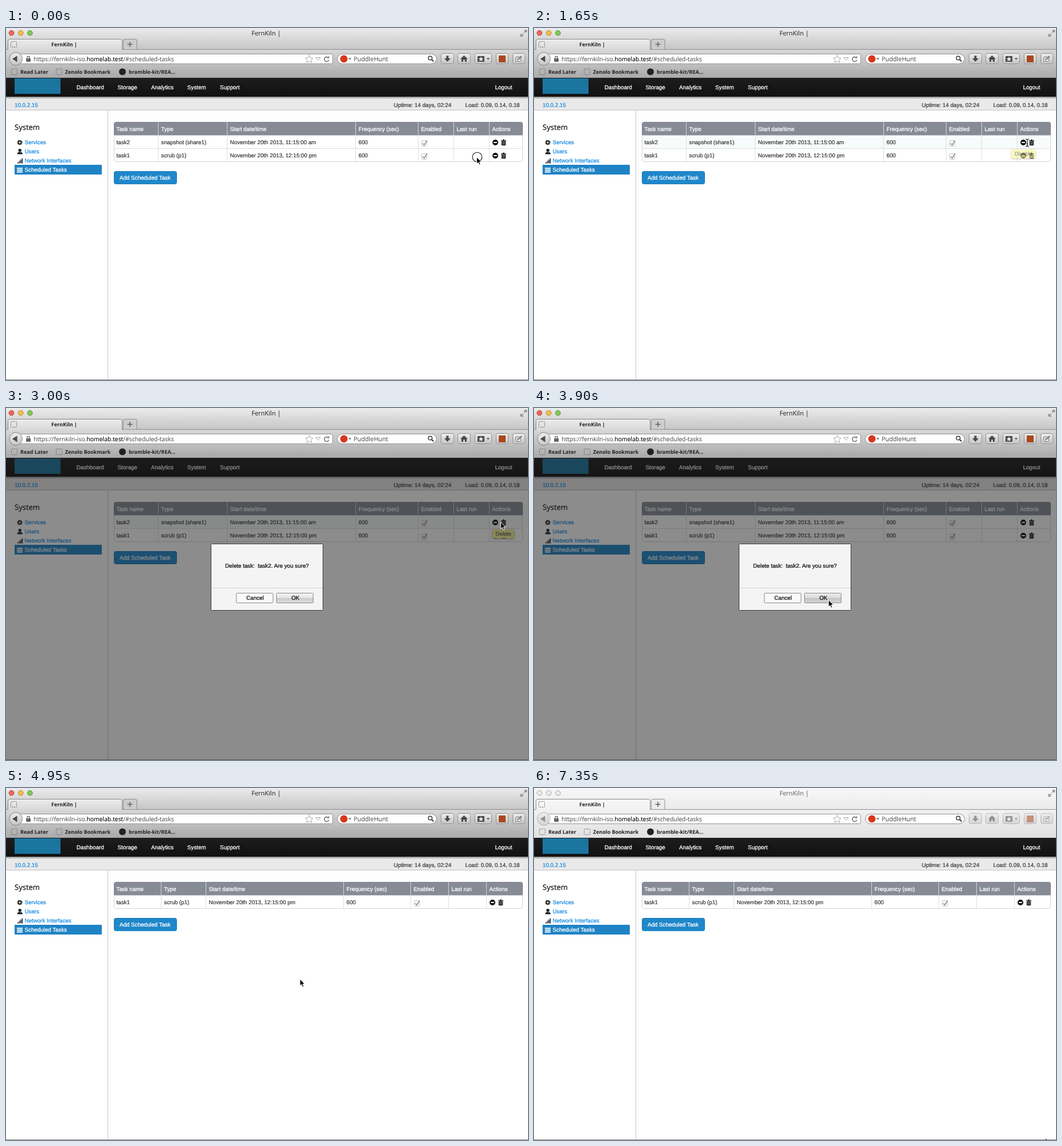
Animation, 910 px wide and 615 px high, one loop 7390 ms. Source, as an HTML page:

```html
<!DOCTYPE html>
<html lang="en">
<head>
<meta charset="utf-8">
<title>Scheduled tasks</title>
<style>
  html, body { margin: 0; width: 100%; height: 100%; overflow: hidden; background: #fff; }
  svg { display: block; }
  text {
    font: 9.77px "Liberation Sans", Arial, sans-serif; color: #333; fill: currentColor;
    stroke: currentColor; stroke-width: .2; text-rendering: geometricPrecision; white-space: pre;
  }
  .ui { font: 10.4px "Open Sans", sans-serif; color: #555; stroke-width: .1; }
  .bold { font: bold 9px "Open Sans", sans-serif; color: #222; stroke-width: 0; }
  .head { font: 13px "Open Sans", sans-serif; color: #111; }
  .white { color: #fff; stroke-width: .3; }
  .link { color: #0a86e0; }
  .black { color: #000; }
  .tip { font-size: 9.4px; color: #555; }
</style>
</head>
<body>
<svg id="stage" width="910" height="615" viewBox="0 0 910 615">
  <defs>
    <linearGradient id="titleBg" x2="0" y2="1"><stop stop-color="#ebebeb"/><stop offset="1" stop-color="#c6c6c6"/></linearGradient>
    <linearGradient id="tabBg" x2="0" y2="1"><stop stop-color="#ececec"/><stop offset="1" stop-color="#d9d9d9"/></linearGradient>
    <linearGradient id="toolBg" x2="0" y2="1"><stop stop-color="#d8d8d8"/><stop offset="1" stop-color="#a9a9a9"/></linearGradient>
    <linearGradient id="keyBg" x2="0" y2="1"><stop stop-color="#eee"/><stop offset="1" stop-color="#c4c4c4"/></linearGradient>
    <linearGradient id="navBg" x2="0" y2="1"><stop stop-color="#1d1d1d"/><stop offset="1" stop-color="#111"/></linearGradient>
    <linearGradient id="shade" x2="0" y2="1"><stop stop-color="#8c8c8c"/><stop offset="1" stop-color="#e8e8e8"/></linearGradient>
    <linearGradient id="okBg" x2="0" y2="1"><stop stop-color="#f6f6f6"/><stop offset=".5" stop-color="#e2e2e2"/><stop offset=".52" stop-color="#cbcbcb"/><stop offset="1" stop-color="#dedede"/></linearGradient>
    <filter id="soft" x="-30%" y="-50%" width="160%" height="220%"><feDropShadow dx="0" dy="1" stdDeviation="1.8" flood-color="#000" flood-opacity=".45"/></filter>
  </defs>
</svg>
<script>
const LOOP = 7390;
const stage = document.getElementById('stage');

const rect = (x, y, w, h, fill, more = '') =>
  `<rect x="${x}" y="${y}" width="${w}" height="${h}" fill="${fill}" ${more}/>`;
const box = (x, y, w, h, fill, stroke, r = 0) =>
  rect(x + .5, y + .5, w - 1, h - 1, fill, `stroke="${stroke}" rx="${r}"`);
const text = (x, y, s, cls = '', more = '') => `<text x="${x}" y="${y}" class="${cls}" ${more}>${s}</text>`;
const path = (d, fill, more = '') => `<path d="${d}" fill="${fill}" ${more}/>`;
const line = (d, color, w = 1) => path(d, 'none', `stroke="${color}" stroke-width="${w}"`);
const circle = (x, y, r, fill, more = '') => `<circle cx="${x}" cy="${y}" r="${r}" fill="${fill}" ${more}/>`;
const group = (id, inner, more = '') => `<g id="${id}" ${more}>${inner}</g>`;
const blank = (x, y) => rect(x + .5, y + .5, 10, 10, 'none', 'stroke="#666" stroke-dasharray="2 1.4" rx="1"');

const tabShape = 'M3.5 38V23q0-3.5 3.5-3.5H199q3.5 0 3.5 3.5V38';
const plusShape = 'M204.500 37V22q0-2.500 2.500-2.500h18.500q2.500 0 2.500 2.500V37';

function chromeBack() {
  return rect(0, 0, 910, 37, 'url(#titleBg)') + rect(0, 37, 910, 50, 'url(#toolBg)') +
    path(plusShape, '#cdcdcd') + path(tabShape, 'url(#tabBg)') +
    rect(0, 0, 910, 87, '#fff', 'id="veil"') +
    line('M0 37.5H3.5M202.5 37.5H910', '#8f8f8f') + line(plusShape, '#8f8f8f') + line(tabShape, '#8a8a8a');
}

function lights() {
  const one = (x, fill, edge) => circle(x, 8.7, 4.3, fill, `stroke="${edge}"`);
  return group('lit', one(9.5, '#f0645a', '#b5362f') + one(25.7, '#f6bd4c', '#b98324') + one(41.8, '#83c95a', '#4c8d2f')) +
    group('unlit', [9.5, 25.7, 41.8].map(x => one(x, '#ececec', '#a0a0a0')).join(''));
}

function toolButtons() {
  const key = (x, w) => box(x, 44, w, 19, 'url(#keyBg)', '#929292', 3);
  const ink = '#4a4a4a';
  return key(758, 23) + path('M767.5 48.5h4v4.5h3.5l-5.5 6-5.5-6h3.5z', ink) +
    key(787, 23) + path('M798.5 48l6.5 6h-2v5h-3v-3.5h-3v3.5h-3v-5h-2z', ink) +
    key(817, 30) + rect(822, 49, 12, 10, ink, 'rx="1"') +
    path('M828 50l1.3 2.7 3 .3-2.2 2 .6 3-2.7-1.5-2.7 1.5.6-3-2.2-2 3-.3z', '#e4e4e4') +
    path('M838 52.5h5l-2.5 3z', ink) +
    key(854, 22) + rect(859, 48, 12, 12, '#a9481c') +
    key(883, 22) + box(888, 50, 10, 9, '#eee', '#777', 1) + line('M892 56l7-7', '#777', 2) + line('M890 53h4M890 56h3', '#888') +
    circle(17, 54, 11.3, 'url(#keyBg)', 'stroke="#808080"') + path('M11 54l8.5-5.5v11z', ink);
}

function chromeFront() {
  const star = path('M528.5 47.5l2 4.5 4.7.5-3.5 3.2 1 4.8-4.2-2.5-4.2 2.5 1-4.8-3.5-3.2 4.7-.5z', '#fff', 'stroke="#aaa"');
  return lights() +
    text(428, 13, 'FernKiln |', 'ui', 'id="title" style="font-size:11px;color:#333"') +
    line('M897 14.5h4.5M897.5 14.5v-4.5M898 14l4-4M907.5 4h-4.5M907.5 3.5v4.5M907 4l-4 4', '#777', 1.2) +
    blank(8, 23) + text(79, 32, 'FernKiln |', 'bold') +
    line('M211.5 28.5h9M216 24v9', '#5e5e5e', 1.5) +
    box(24, 45, 546, 18, '#fff', '#929292', 3) +
    group('tools', toolButtons()) +
    rect(35, 53, 8, 6, '#666', 'rx="1"') + line('M36.8 53.5v-2a2.2 2.2 0 0 1 4.4 0v2', '#666', 1.3) +
    text(48, 58, 'https://fernkiln-iso.<tspan fill="#000" stroke="#000">homelab.test</tspan>/#scheduled-tasks', 'ui') +
    star + path('M540 51.5h8l-4 5z', '#fff', 'stroke="#aaa"') +
    line('M561.5 51.5a4 4 0 1 0 1.3 4', '#777', 1.6) + path('M559.5 52.8h4v-4z', '#777') +
    box(577, 45, 174, 18, '#fff', '#929292', 9) +
    circle(589, 54, 6.5, '#d9361f') + path('M597 52.5h5l-2.5 3z', '#666') +
    text(606, 58, 'PuddleHunt', 'ui', 'style="font-size:10.8px"') +
    circle(739.5, 52.5, 3.3, 'none', 'stroke="#333" stroke-width="1.4"') + line('M742 55l3.5 3.5', '#333', 1.8) +
    blank(9, 71) + text(25, 80, 'Read Later', 'bold') +
    blank(87, 71) + text(103, 80, 'Zenolo Bookmark', 'bold') +
    circle(203, 76.5, 6, '#222') + text(214, 80, 'bramble-kit/REA...', 'bold');
}

function icons(x, y) {
  return circle(x + .5, y, 5, '#111') + rect(x - 2.3, y - 1, 5.6, 2, '#fff') +
    path(`M${x + 10.5} ${y - 3.8}h3v-1.4h3v1.4h3v1.5h-9z`, '#222') +
    rect(x + 11.3, y - 1.8, 7.4, 7, '#222', 'rx="1"') +
    line(`M${x + 13.3} ${y - .5}v4.3M${x + 15} ${y - .5}v4.3M${x + 16.7} ${y - .5}v4.3`, '#aaa', .6);
}

function table(cols, rows) {
  const heads = ['Task name', 'Type', 'Start date/time', 'Frequency (sec)', 'Enabled', 'Last run', 'Actions'];
  const rowTop = r => Math.floor(188 + r * 23.4);
  const bottom = rowTop(rows.length);
  let s = path('M188 187.5V168q0-4 4-4H897q4 0 4 4v19.5z', '#868b96');
  heads.forEach((h, i) => { s += text(cols[i] + 4.5, 180, h, 'white'); });
  rows.forEach((row, r) => {
    const y = rowTop(r);
    if (rows.length > 1 && !r) s += rect(189, y, 711, 22, '#f8fbfb', 'id="hover"');
    if (r) s += line(`M188 ${y - .5}H901`, '#ddd');
    row.forEach((v, i) => { s += text(cols[i] + 4.5, y + 15, v); });
    s += box(cols[4] + 5, y + 8, 10, 11, '#f8f8f8', '#c4c4c4', 2) +
      line(`M${cols[4] + 7.5} ${y + 13.5}l2.5 3 5-8`, '#8c8c8c', 1.5) +
      icons(cols[6] + 9.5, y + 12);
  });
  cols.slice(1).forEach(x => {
    s += line(`M${x - .5} 164V187.5`, '#d4d5d9') + line(`M${x - .5} 188V${bottom}`, '#ddd');
  });
  s += path(`M188.5 187V${bottom - 4}q0 3.5 3.5 3.5H897q3.5 0 3.5-3.5V187`, 'none', 'stroke="#d5d5d5"');
  const by = bottom + 16;
  return s + box(188, by, 110, 23, '#1f87ca', '#1b7ebd', 3) + text(198, by + 15, 'Add Scheduled Task', 'white');
}

function page() {
  let s = rect(0, 87, 910, 528, '#fff') + rect(0, 123, 910, 20, '#e9e9e9') +
    rect(0, 120, 910, 4, 'url(#shade)') + rect(0, 87, 910, 33, 'url(#navBg)') +
    rect(0, 143, 910, 1, '#c4c4c4') + rect(177, 144, 1, 470, '#c9c9c9') +
    rect(15, 88, 80, 27, '#1a759f');
  const menu = [[123, 'Dashboard'], [194.5, 'Storage'], [253, 'Analytics'], [316, 'System'], [373, 'Support'], [852.5, 'Logout']];
  menu.forEach(([x, v]) => { s += text(x, 107, v, 'white'); });
  s += text(15, 138, '10.0.2.15', 'link') + text(676, 138, 'Uptime: 14 days, 02:24') +
    text(800.5, 138, 'Load: 0.09, 0.14, 0.18') + text(15, 178, 'System', 'head') +
    rect(15, 239, 152, 17, '#1f83c6');
  ['Services', 'Users', 'Network Interfaces', 'Scheduled Tasks'].forEach((v, i) => {
    s += text(32.5, 203 + i * 16, v, i < 3 ? 'link' : 'white');
  });
  s += circle(24, 200, 2.5, 'none', 'stroke="#222" stroke-width="2"') +
    circle(24, 200, 3.9, 'none', 'stroke="#222" stroke-width="1.5" stroke-dasharray="1.6 1.463"') +
    circle(24.2, 213.8, 2.7, '#222') + path('M19.5 220.5q0-3.5 3.3-3.7h2.8q3.3.2 3.3 3.7z', '#222');
  for (let i = 0; i < 4; i++) {
    s += rect(20 + i * 2.5, 234.5 - i * 2.2, 1.7, 2 + i * 2.2, '#222');
    if (i < 3) s += rect(19, 244 + i * 3.2, 10, 2.3, '#e4eff7');
  }
  return s;
}

const tip = (id, x, w, label, tx) => group(id,
  rect(x, 212, w, 15.5, '#f7f295', 'rx="2.5" filter="url(#soft)"') + text(tx, 223, label, 'tip'));

function dialog() {
  return rect(0, 87, 910, 528, 'rgba(26,26,26,.5)') +
    box(357, 237, 196, 117, '#f4f4f4', '#3c3c3c', 1) + rect(358, 314, 194, 1, '#d4d4d4') +
    text(382, 279, 'Delete task:\u00a0 task2. Are you sure?', 'black') +
    box(401, 323, 65, 18, '#fafafa', '#8a8a8a', 1) + text(419, 335, 'Cancel', 'black') +
    box(471, 323, 65, 18, 'url(#okBg)', '#8a8a8a', 1) +
    rect(472, 324, 63, 16, '#000', 'id="press"') + text(497.5, 335, 'OK', 'black');
}

function pointers() {
  const edge = 'stroke="#fff" stroke-width=".9" stroke-linejoin="round"';
  return group('cursor',
    group('ring', circle(1.5, .5, 8.3, 'none', 'stroke="#111" stroke-width="1.1"')) +
    group('arrow', path('M.5 .5v11.7l2.7-2.5 1.9 4.4 2-.9-1.9-4.2h3.6z', '#000', edge)) +
    group('hand', path('M-1 1q1-1.5 2 0v4.5q1-1 2 .2 1-.7 1.8.3 1.6-.5 1.9 1v3q-.4 1.5-1.2 2.5v2h-5.5l-.7-2-3.3-4.5q.3-2 3 .3z', '#fff',
      'stroke="#000" stroke-linejoin="round"') + line('M1.8 9v3M3.5 9v3M5.1 9v3', '#333', .7)) +
    group('beam', line('M-3-6q3 0 3 2v9q0 2-3 2M3-6q-3 0-3 2v9q0 2 3 2M-1.5 2.5h3', '#222', 1.2)));
}

stage.insertAdjacentHTML('beforeend',
  chromeBack() + chromeFront() + page() +
  group('before', table([188, 266, 386, 610, 719, 781, 843], [
    ['task2', 'snapshot (share1)', 'November 20th 2013, 11:15:00 am', '600'],
    ['task1', 'scrub (p1)', 'November 20th 2013, 12:15:00 pm', '600']])) +
  group('after', table([188, 271, 349, 589, 706, 772, 838], [
    ['task1', 'scrub (p1)', 'November 20th 2013, 12:15:00 pm', '600']])) +
  rect(0, 614, 910, 1, '#8f8f8f') +
  tip('disable', 831.5, 43, 'Disable', 838) + tip('remove', 848, 38, 'Delete', 853.5) +
  group('dialog', dialog()) + pointers());

// Each row: time, pointer shape, x, y, click ring
const moves = [
  [0, 'arrow', 820, 225, 1], [150, 'arrow', 833, 204], [300, 'arrow', 840, 204],
  [450, 'hand', 849, 203.5], [600, 'hand', 851, 200], [1650, 'beam', 860, 200],
  [1800, 'hand', 863, 198], [2850, 'hand', 863, 198, 1], [3000, 'arrow', 862, 199],
  [3450, 'arrow', 658, 262], [3600, 'arrow', 527, 331], [3750, 'arrow', 527, 334],
  [3900, 'arrow', 513, 335], [4050, 'arrow', 512, 333.5], [4800, 'arrow', 512, 333, 1],
  [4950, 'arrow', 512, 333.5], [6000, 'arrow', 704, 457], [6150, 'arrow', 895, 587],
  [6300, 'arrow', 899, 594], [6450, 'none', 0, 0], [7350, 'arrow', 891, 611]
];
// Stepped opacity of each part: [time, value]
const fades = {
  disable: [[0, 0], [600, .5], [750, 1], [1650, .6], [1800, 0]],
  remove: [[0, 0], [1800, .5], [1950, 1], [3150, 0]],
  hover: [[0, 0], [150, 1], [3450, 0]],
  dialog: [[0, 0], [3000, 1], [4950, 0]],
  press: [[0, 0], [3600, .04], [4800, .2]],
  before: [[0, 1], [4950, 0]],
  after: [[0, 0], [4950, 1]],
  veil: [[0, 0], [7350, .65]],
  lit: [[0, 1], [7350, 0]],
  unlit: [[0, 0], [7350, 1]],
  tools: [[0, 1], [7350, .55]],
  title: [[0, 1], [7350, .7]]
};
const part = id => document.getElementById(id);
const current = (steps, t) => steps.findLast(s => s[0] <= t);

function draw(t) {
  for (const id in fades) part(id).style.opacity = current(fades[id], t)[1];
  const [, shape, x, y, ring] = current(moves, t);
  part('cursor').setAttribute('transform', `translate(${x} ${y})`);
  for (const id of ['arrow', 'hand', 'beam']) part(id).style.display = id === shape ? '' : 'none';
  part('ring').style.display = ring ? '' : 'none';
}

const start = performance.now();
function tick() {
  draw((performance.now() - start) % LOOP);
  requestAnimationFrame(tick);
}
tick();
</script>
</body>
</html>
```
